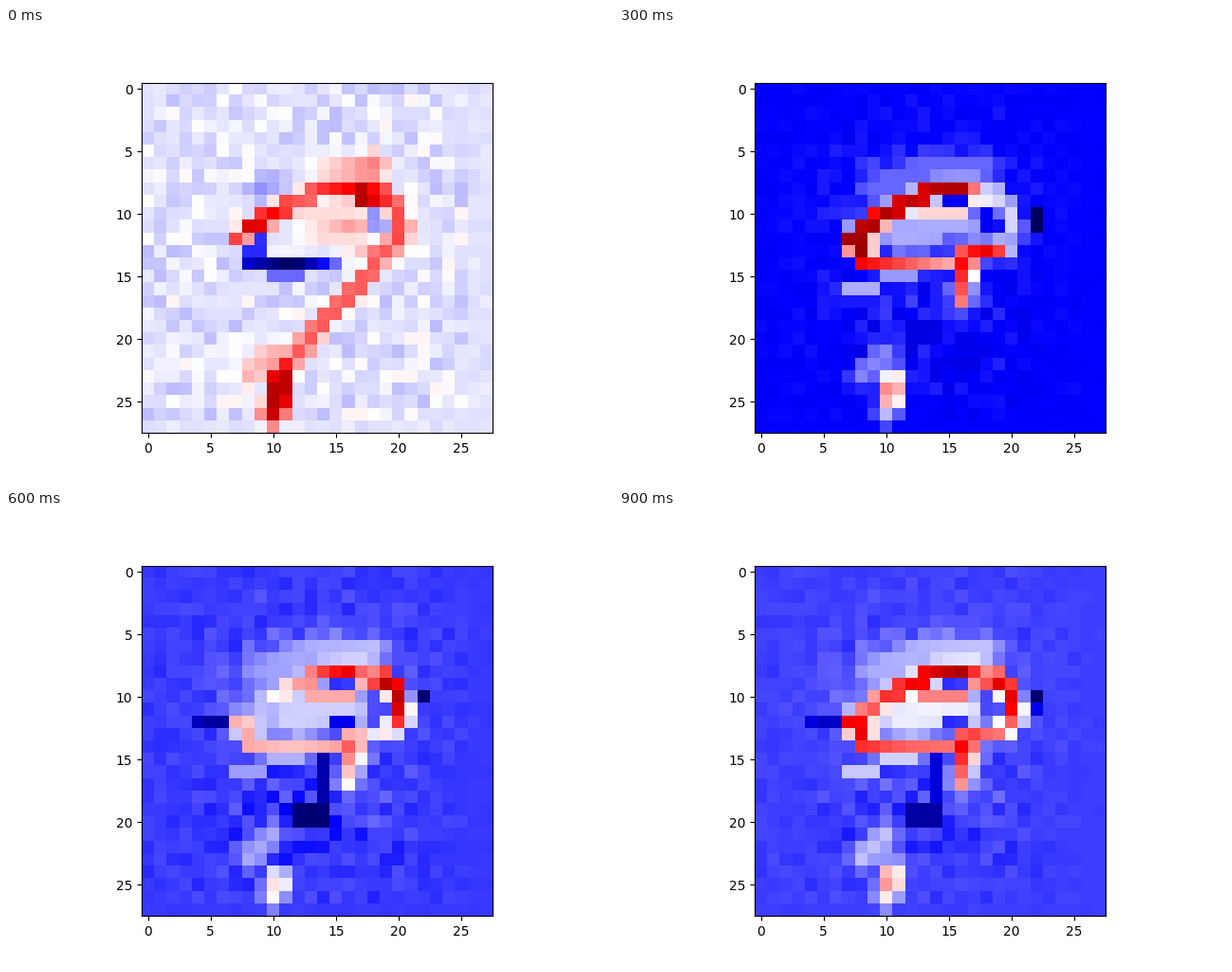
Animation of 640 by 480 pixels, one loop 1 s. Source, as a matplotlib script:

```python
import matplotlib.pyplot as plt
import numpy as np
from matplotlib.animation import FuncAnimation

SIZE = 28
FRAMES, INTERVAL = 10, 100
ROW, COL = np.mgrid[:SIZE, :SIZE]
rng = np.random.default_rng(7)


def trace(field, points, width, tones):
    """Paint a soft-edged path of (col, row) points, tones spread along it."""
    x, y = np.array(points, float).T
    length = np.concatenate([[0], np.cumsum(np.hypot(np.diff(x), np.diff(y)))])
    t = np.linspace(0, 1, 60)
    px, py = (np.interp(t * length[-1], length, axis) for axis in (x, y))
    distance = np.hypot(COL[..., None] - px, ROW[..., None] - py)
    nearest = distance.argmin(axis=-1)
    tones = np.atleast_1d(tones)
    tone = np.interp(t[nearest], np.linspace(0, 1, len(tones)), tones)
    cover = np.exp(-(distance.min(axis=-1) / width) ** 4)
    field += cover * (tone - field)


def ground(lift, far, near):
    """Seeded grain, stronger around the figure and calm along two edges."""
    centre = np.exp(-((COL - 13) / 8) ** 4 - ((ROW - 14) / 11) ** 4)
    glow = np.exp(-((COL - 13) / 6.5) ** 2 - ((ROW - 10) / 5.5) ** 2)
    calm = np.where((COL > 25) | (ROW > 26), 0.25, 1)
    grain = np.clip(rng.normal(size=(SIZE, SIZE)), -1.7, 1.7)
    return lift * glow + calm * grain * (far + (near - far) * centre)


# Tones are relative to the background level of 0..100 (blue..red).
early = ground(lift=1, far=2.2, near=2.2)
faded = ground(lift=2, far=0.5, near=2)
middle = ground(lift=7, far=0.5, near=3)
late = ground(lift=6, far=0.8, near=3)


def part(points, width, start=None, mid=None, end=None):
    for field, tones in ((early, start), (faded, start), (middle, mid), (late, end)):
        if tones is not None:
            trace(field, points, width, tones)


# Loop of the nine, from the outside in
part([(9, 8), (13, 6.3), (18, 6.3)], 1.2, (-8, 15), 10, (10, 13))
part([(11, 11.7), (16, 11)], 1.5, (0, 12), 17, 15)
part([(13, 10), (16, 10)], 0.7, 6, 29, 28)
part([(15, 12), (16, 12)], 0.7, 6, 9, -8)
part([(8, 11.5), (10, 10), (12, 9), (14, 8), (17, 8)], 0.8,
     (38, 18, 30), (67, 62, 67), (8, 30, 52))
part([(15, 9), (16, 9)], 0.6, 6, -2, -1)
part([(17, 8.6), (19, 8.6), (20, 10), (20.3, 11.5)], 0.8,
     (44, 21, 20), (28, 20, 22), (28, 62, 50))
part([(18, 10), (18.4, 11)], 0.7, -8, -1, 2)
part([(7.3, 12), (8, 13)], 0.9, (22, -18), 70, 28)
part([(9, 12), (9, 13)], 0.7, -18, 30, 14)
part([(20, 12), (19, 13), (16.5, 13)], 0.8, (21, 18, 5), (16, 55, 46), (40, 14, 30))
part([(8, 14), (12, 14), (15, 14)], 0.6, (-29, -47, -12), (50, 42, 33), (28, 25, 28))
part([(10, 15), (12, 15)], 0.6, -12, 15, 12)
part([(7, 16), (9, 16)], 0.7, 0, 17, 10)

# Stem, which breaks up after the start
part([(16.3, 14), (16, 17)], 0.9, None, (50, 38), (36, 20))
part([(14, 15), (14, 18)], 0.6, None, 3, -17)
part([(12, 19.5), (14, 19.5)], 0.9, None, -4, -27)
trace(early, [(18.2, 14), (16, 16.8), (14.5, 18), (12.5, 20.5), (11, 22)], 0.85, 19)

# Foot and the dark spots at both sides
part([(10, 21), (8, 23)], 1, 10, 13, 11)
part([(10.7, 23), (10, 26)], 1, (40, 44, 38), (27, 41, 18), (-4, 24, 20))
part([(4.5, 12), (6, 12)], 0.7, -3, -1, -19)
part([(22, 10), (22, 11)], 0.7, 0, -22, (-25, 0))

# Key poses: background level and the share of each stage
KEY_TIMES = [0, 2, 3, 5, 6, 8, 9]
LEVEL = [47.3, 45, 25, 36, 30.5, 34.5, 31]
SHARES = [
    (early, [1, 0, 0, 0, 0, 0, 0]),
    (faded, [0, 1, 0, 0, 0, 0, 0]),
    (middle, [0, 0, 1, 0.6, 0, 0, 0.4]),
    (late, [0, 0, 0, 0.4, 1, 0.95, 0.7]),
]


def grid_at(frame):
    def now(values):
        return np.interp(frame, KEY_TIMES, values)

    return now(LEVEL) + sum(now(share) * field for field, share in SHARES)


fig, ax = plt.subplots(figsize=(6.4, 4.8), dpi=100)
image = ax.imshow(grid_at(0), cmap="seismic", vmin=0, vmax=100)


def update(frame):
    image.set_data(grid_at(frame))
    return [image]


anim = FuncAnimation(fig, update, frames=FRAMES, interval=INTERVAL, repeat=True)
plt.show()
```
